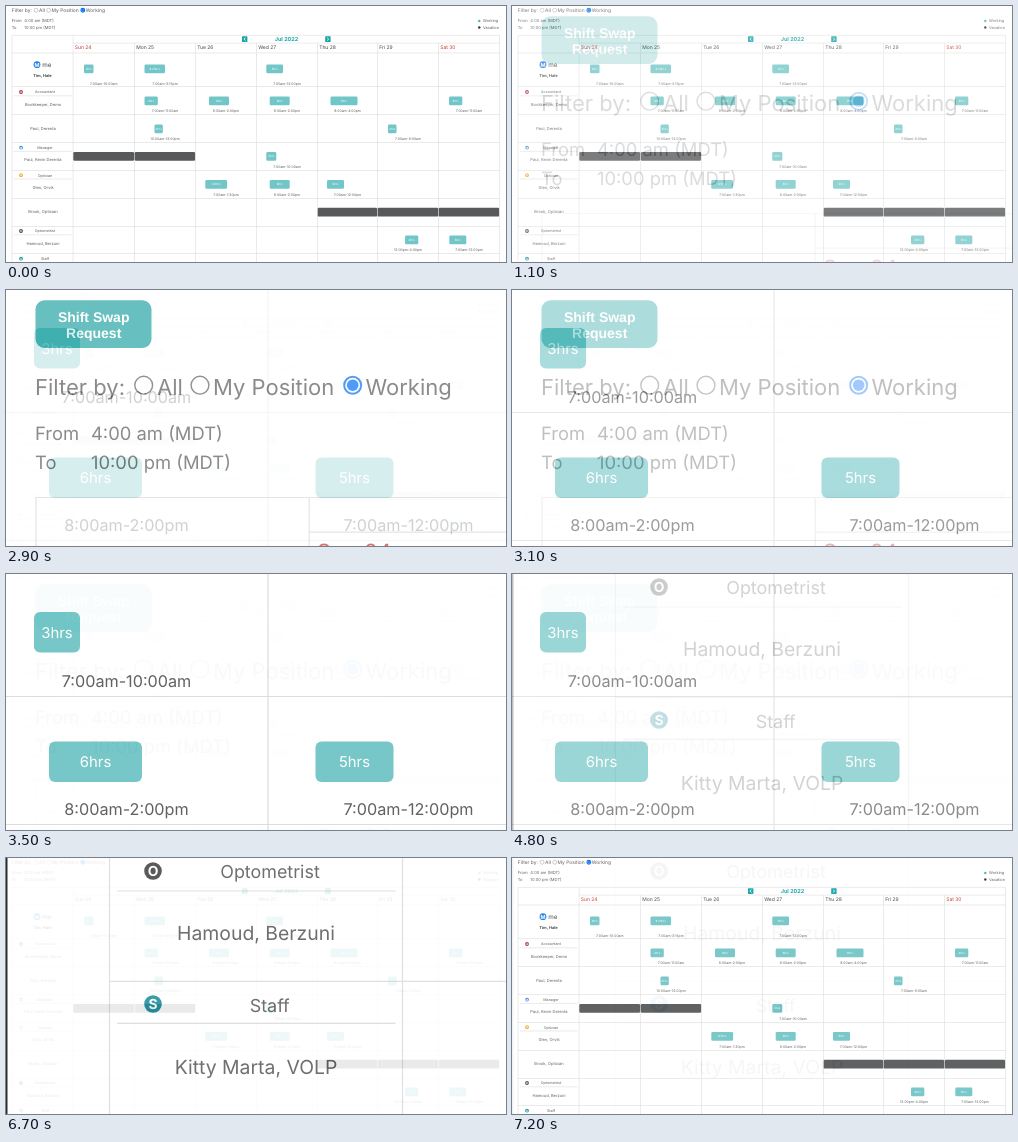
Animation of 500x256 px, one loop 7.62 s. Source, as an HTML page:

```html
<!DOCTYPE html>
<html lang="en">
<head>
<meta charset="utf-8">
<title>Shift schedule</title>
<style>
  html, body { margin: 0; width: 100%; height: 100%; overflow: hidden; background: #fff; }
  svg { display: block; width: 100vw; height: 100vh; }
  text { font-family: Inter, sans-serif; fill: #5c5c5c; text-rendering: geometricPrecision; }
  .grid { fill: none; stroke: #dcdcdc; stroke-width: var(--line, 1.2px); vector-effect: non-scaling-stroke; }
  .mid { text-anchor: middle; }
  .bold { font-weight: 700; }
  .white { fill: #fff; }
  .shift { fill: #73c6c8; }
  .button text { font: 700 14px "Liberation Sans", Arial, sans-serif; fill: #fff; }
  .ring { fill: #fff; stroke: #0b74f5; stroke-width: var(--ring, 2px); }
  .radio { fill: #fff; stroke: #666; stroke-width: 1.4px; }
  #overview { --line: .6px; --ring: 5px; }

  /* Cross-fades advance in 100 ms steps. */
  #filters, #shifts, #staff { opacity: 0; animation: 7620ms step-end infinite; }
  #filters { animation-name: filters; }
  #shifts { animation-name: shifts; }
  #staff { animation-name: staff; }
  @keyframes filters {
    0% { opacity: 0; }
    13.12% { opacity: .06; animation-timing-function: steps(6); }
    20.99% { opacity: .985; }
    72%, 100% { opacity: 0; }
  }
  @keyframes shifts {
    0% { opacity: 0; }
    38.05% { opacity: .28; animation-timing-function: steps(4); }
    43.3% { opacity: .95; }
    45.93% { opacity: .97; }
    72%, 100% { opacity: 0; }
  }
  @keyframes staff {
    0% { opacity: 0; }
    62.99% { opacity: .27; animation-timing-function: steps(5); }
    69.55% { opacity: 1; }
    87.92% { opacity: .88; animation-timing-function: steps(5); }
    94.48%, 100% { opacity: .05; }
  }
</style>
</head>
<body>
<svg viewBox="0 0 500 256" preserveAspectRatio="none">
  <defs>
    <g id="page">
      <g id="table"></g>
      <g transform="translate(-.71 -17.05) scale(.2236)">
        <g class="button">
          <rect x="29.5" y="10.3" width="116" height="47.7" rx="9" fill="#2aa6a5"/>
          <text class="mid" x="87.7" y="32">Shift Swap</text>
          <text class="mid" x="87.7" y="48">Request</text>
        </g>
        <g font-size="22">
          <text x="29" y="104.6">Filter by:</text>
          <text x="151" y="104.6">All</text>
          <text x="207" y="104.6">My Position</text>
          <text x="359.5" y="104.6">Working</text>
        </g>
        <circle class="radio" cx="137.7" cy="95.2" r="8.9"/>
        <circle class="radio" cx="194" cy="95.2" r="8.9"/>
        <circle class="ring" cx="346.7" cy="95.2" r="8.5"/>
        <circle cx="346.7" cy="95.2" r="5.8" fill="#0b74f5"/>
        <g font-size="18.4">
          <text x="29" y="150">From</text>
          <text x="85" y="150">4:00 am (MDT)</text>
          <text x="29" y="179">To</text>
          <text x="85" y="179">10:00 pm (MDT)</text>
        </g>
      </g>
    </g>
  </defs>

  <g id="overview">
    <rect width="500" height="256" fill="#fff"/>
    <use href="#page"/>
  </g>
  <g id="filters">
    <rect width="500" height="256" fill="#fff"/>
    <use href="#page" transform="translate(3.17 76.25) scale(4.472)"/>
  </g>
  <g id="shifts"></g>
  <g id="staff"></g>
</svg>
<script>
  const text = (x, y, size, str, cls = "mid", color = "") =>
    `<text x="${x}" y="${y}" font-size="${size}" class="${cls}"${color && ` style="fill:${color}"`}>${str}</text>`;
  const rect = (x, y, w, h, r, attrs) =>
    `<rect x="${x}" y="${y}" width="${w}" height="${h}" rx="${r}" ${attrs}/>`;
  const dot = (x, y, r, color) => `<circle cx="${x}" cy="${y}" r="${r}" fill="${color}"/>`;
  const line = d => `<path class="grid" d="${d}"/>`;
  const badge = (x, y, r, color, letter) =>
    dot(x, y, r, color) + text(x, y + r * .57, r * 1.58, letter, "mid bold white");
  const backdrop = rect(0, 0, 500, 256, 0, 'fill="#fff"');
  const fill = (id, parts) => { document.getElementById(id).innerHTML = parts.flat().join(""); };

  const TEAL = "#16a5a8", RED = "#c8382d", DARK = "#58595b";
  const columns = [67.1, 128.5, 189.5, 250.5, 311.5, 371.5, 432.5, 493.5];
  const days = ["Sun 24", "Mon 25", "Tue 26", "Wed 27", "Thu 28", "Fri 29", "Sat 30"];
  const rowLines = [47, 80.5, 108.5, 136.5, 164.5, 192.5, 220.5, 247.5];

  const arrow = (x, dir) => rect(x, 30.2, 5.4, 5.8, .6, `fill="${TEAL}"`) +
    `<path d="M${x + 2.7 - dir * .8} 31.7l${dir * 1.6} 1.4l${-dir * 1.6} 1.4" fill="none" stroke="#fff" stroke-width=".8"/>`;

  const positions = [
    [86, "#b3243b", "Accountant"], [141.6, "#2f86dd", "Manager"], [169.2, "#f2a72e", "Optician"],
    [225, "#444", "Optometrist"], [252.6, "#1d8fa0", "Staff"]
  ].map(([y, color, name]) => badge(15, y, 1.9, color, name[0]) +
    text(39, y + 1.3, 3.68, name) + line(`M7.5 ${y + 3.8}H65.5`));

  const people = [
    [100.3, "Bookkeeper, Demo"], [124.4, "Paul, Derenta"], [155.4, "Paul, Kevin Derenta"],
    [183.3, "Glen, Orvik"], [207.3, "Brook, Optician"], [239, "Hamoud, Berzuni"]
  ].map(([y, name]) => text(37, y, 4.05, name));

  const shiftRows = [
    [58.5, 78.6, [[0, 78, 9.5, 3, "7:00am-10:00am"], [1, 138.5, 20.5, 8.25, "7:00am-3:15pm"], [3, 260.3, 16.7, 5, "7:00am-12:00pm"]]],
    [90.5, 106.3, [[1, 138.5, 13.3, 4, "7:00am-11:00am"], [2, 203, 20, 6, "8:00am-2:00pm"], [3, 263.7, 20, 6, "8:00am-2:00pm"],
      [4, 324.5, 27, 8, "8:00am-4:00pm"], [6, 443, 13.3, 4, "7:00am-11:00am"]]],
    [118.5, 134.3, [[1, 148.5, 8.3, 2, "10:00am-12:00pm"], [5, 382, 8.5, 2, "7:00am-9:00am"]]],
    [146, 162.2, [[3, 260.3, 10, 3, "7:00am-10:00am"]]],
    [174, 189.8, [[2, 199.3, 21.8, 6.5, "7:00am-1:30pm"], [3, 263.7, 20, 6, "8:00am-2:00pm"], [4, 321, 17, 5, "7:00am-12:00pm"]]],
    [229.5, 245.3, [[5, 399, 13.3, 4, "12:00pm-4:00pm"], [6, 443.3, 17, 5, "7:00am-12:00pm"]]]
  ].flatMap(([top, base, shifts]) => shifts.map(([col, x, w, hours, time]) =>
    rect(x, top, w, 8.8, 1.3, 'class="shift"') +
    text(x + w / 2, top + 5.4, 2.9, hours + "hrs", "mid white") +
    text((columns[col] + columns[col + 1]) / 2, base, 3.45, time)));

  const vacations = [[146, 0], [146, 1], [201.8, 4], [201.8, 5], [201.8, 6]].map(([y, col]) =>
    rect(columns[col] + .2, y, columns[col + 1] - columns[col] - .6, 8.8, 1.2, `fill="${DARK}"`));

  fill("table", [
    line("M6 300V29.35H493.5M67.1 37.1H493.5"),
    columns.map((x, i) => line(`M${x} ${i % 7 ? 37.1 : 29.35}V300`)),
    rowLines.map(y => line(`M6 ${y}H493.5`)),
    text(280.5, 35.2, 5.5, "Jul 2022", "mid bold", TEAL), arrow(236, -1), arrow(319.2, 1),
    days.map((day, i) => text(columns[i] + 1.7, 43.4, 5, day, "", i % 6 ? "#444" : RED)),
    dot(473.3, 15, 1.2, "#3fb9bb"), text(477, 16.4, 3.9, "Working", ""),
    dot(473.3, 21.5, 1.2, "#333"), text(477, 22.9, 3.9, "Vacation", ""),
    badge(31, 58.7, 3.4, "#2483e2", "M"), text(36.3, 61, 6.3, "me", "", "#444"),
    text(36.5, 71.3, 4, "Tim, Hale", "mid bold", "#444"),
    positions, people, shiftRows, vacations
  ]);

  fill("shifts", [
    backdrop,
    line("M0 122.5H500M0 250.5H500M262 0V256"),
    [[28, 38, 46, 3, 120.5, 113, "7:00am-10:00am"],
     [43, 167.5, 93, 6, 120.5, 241, "8:00am-2:00pm"],
     [309.5, 167.5, 78, 5, 402.5, 241, "7:00am-12:00pm"]
    ].map(([x, y, w, hours, cx, base, time]) =>
      rect(x, y, w, 40.5, 6, 'class="shift"') +
      text(x + w / 2, y + 25.5, 14.9, hours + "hrs", "mid white") +
      text(cx, base, 16.2, time))
  ]);

  fill("staff", [
    backdrop,
    rect(0, 0, 1.5, 256, 0, 'fill="#111"'),
    line("M103.5 0V256M396.5 0V256M103.5 123.3H500M111 33H389.5M111 165.3H389.5"),
    badge(147, 13, 8.8, "#444", "O"), text(264, 20, 17.9, "Optometrist"),
    text(250, 82, 19.4, "Hamoud, Berzuni"),
    badge(147, 146, 8.8, "#1d8fa0", "S"), text(263.7, 153.7, 17.9, "Staff"),
    text(250, 216, 19.4, "Kitty Marta, VOLP")
  ]);
</script>
</body>
</html>
```
